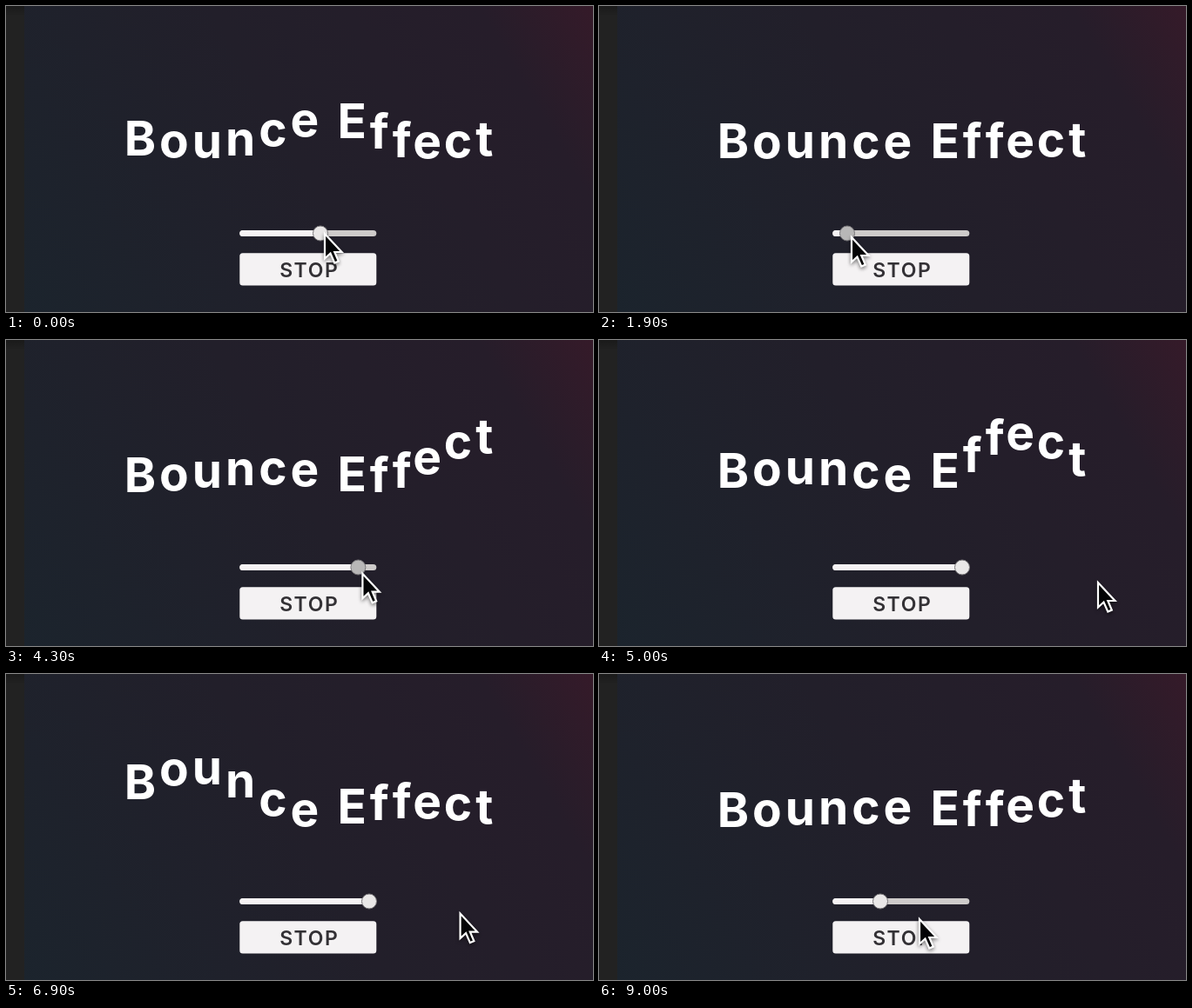
Recreate the animation shown at these times as an HTML page with a canvas. Size 674 by 352 pixels, loop 9.1 s.

```html
<!DOCTYPE html>
<html lang="en">
<head>
<meta charset="utf-8">
<title>Bounce Effect</title>
<style>
  html, body { margin: 0; height: 100%; overflow: hidden; }
  body {
    background:
      linear-gradient(rgba(0, 0, 0, .25), transparent) 0 0 / 21px 12px no-repeat,
      linear-gradient(#222, #222) 0 0 / 21px 100% no-repeat,
      linear-gradient(60deg, #1b242d, #221f2a 50%, #261d2a 85%, #351a29);
  }
  canvas { display: block; }
</style>
</head>
<body>
<canvas id="stage" width="674" height="352"></canvas>
<script>
const ctx = document.getElementById('stage').getContext('2d');
const LOOP = 9100, STEP = 100;
const FONT = 'Inter, "Open Sans", sans-serif';
const TITLE = 'Bounce Effect';
const TRACK = { left: 268.3, width: 157, min: 277, range: 140 };
const GRIP = 4; // pointer tip sits this far right of the thumb centre

// Pointer moves: [start, end, x, y, drags the thumb]
const MOVES = [
  [1200, 1900, 289, 264, true],
  [3700, 4450, 421, 267, true],
  [4450, 4800, 572, 277],
  [5800, 6100, 565, 277],
  [6750, 7150, 421, 266],
  [7250, 7500, 327, 267, true],
  [7500, 7800, 515, 280],
  [8400, 9000, 367, 280]
];

function glide(t, start, end) {
  const u = Math.min(1, Math.max(0, (t - start) / (end - start)));
  return (1 - Math.cos(Math.PI * u)) / 2;
}

function poseAt(t) {
  const pose = { x: 365, y: 260, thumb: 361, pressed: false };
  for (const [start, end, x, y, drags] of MOVES) {
    const u = glide(t, start, end);
    pose.x += (x - pose.x) * u;
    pose.y += (y - pose.y) * u;
    if (!drags) continue;
    pose.thumb += (x - GRIP - pose.thumb) * u;
    if (t >= start - 300 && t < end + 300) pose.pressed = true;
  }
  return pose;
}

// A high hop, then a low one; phase runs 0 to 16 letter steps
const bounce = phase => phase < 7.4
  ? Math.sin(Math.PI * phase / 7.4) ** 2
  : .2 * Math.sin(Math.PI * (phase - 7.4) / 8.6) ** 2;

function setText(size, weight, spacing, color) {
  ctx.font = `${weight} ${size}px ${FONT}`;
  ctx.letterSpacing = spacing + 'px';
  ctx.fillStyle = color;
}

function box(x, y, w, h, r, fill) {
  ctx.fillStyle = fill;
  ctx.beginPath();
  ctx.roundRect(x, y, w, h, r);
  ctx.fill();
}

function drawTitle(t, height) {
  const clock = t + 120 * glide(t, 5400, 7800);
  setText(55, 650, 4, '#fff');
  const left = 349.5 - ctx.measureText(TITLE).width / 2;
  [...TITLE].forEach((char, i) => {
    const x = left + ctx.measureText(TITLE.slice(0, i)).width;
    const phase = (clock / 50 + 25.6 - i) % 16;
    ctx.fillText(char, x, 175.5 - height * bounce(phase));
  });
}

function drawControls(thumb, pressed) {
  const { left, width } = TRACK;
  box(left, 258, width, 7, 3.5, '#cecbca');
  box(left, 258, thumb - left, 7, 3.5, '#f6f3f4');
  ctx.beginPath();
  ctx.arc(thumb, 261.5, 8.5, 0, 7);
  ctx.fillStyle = pressed ? '#b8b7b7' : '#e9e7e7';
  ctx.fill();
  ctx.lineWidth = 1;
  ctx.strokeStyle = '#777578';
  ctx.stroke();

  box(left, 284.2, width, 37.2, 3.5, '#f4f2f3');
  setText(23, 600, 1.6, '#333135');
  ctx.fillText('STOP', 348.3 - ctx.measureText('STOP').width / 2, 312);
}

const arrow = new Path2D('M1 2V30.5L7.5 24.5L12.3 35.5L16.8 33.6L12.3 23H20.5Z');

function drawPointer(x, y) {
  ctx.save();
  ctx.translate(x, y);
  ctx.shadowColor = 'rgba(0,0,0,.4)';
  ctx.shadowBlur = 4;
  ctx.shadowOffsetY = 2;
  ctx.lineWidth = 2.2;
  ctx.strokeStyle = '#fff';
  ctx.fillStyle = '#050507';
  ctx.fill(arrow);
  ctx.stroke(arrow);
  ctx.restore();
}

function draw() {
  const t = Math.floor(performance.now() % LOOP / STEP) * STEP;
  const { x, y, thumb, pressed } = poseAt(t);
  ctx.clearRect(0, 0, 674, 352);
  drawTitle(t, 50 * (thumb - TRACK.min) / TRACK.range);
  drawControls(thumb, pressed);
  drawPointer(x, y);
  requestAnimationFrame(draw);
}
draw();
</script>
</body>
</html>
```
